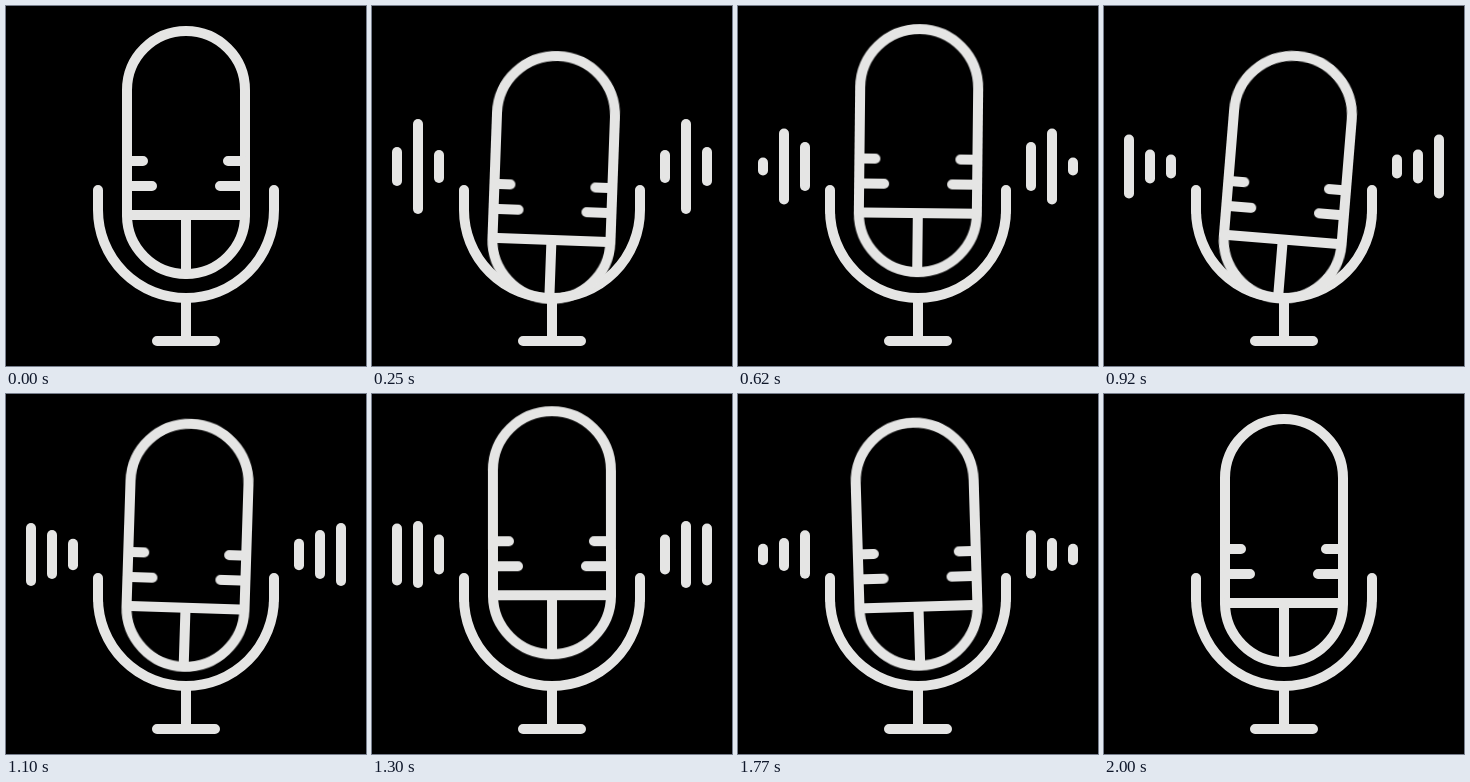
An HTML page for the animation above (2.02 s loop, 360x360 px).

```html
<!DOCTYPE html>
<html lang="en">
<head>
<meta charset="utf-8">
<title>Microphone</title>
<style>
  @property --half { syntax: "<length>"; inherits: false; initial-value: 0px; }

  html, body { margin: 0; width: 100%; height: 100%; overflow: hidden; background: #000; }
  svg { display: block; width: 100vw; height: 100vh; }

  .line { fill: none; stroke: #e5e5e4; stroke-width: 10; stroke-linecap: round; stroke-linejoin: round; }

  .capsule { transform-origin: 180px 194px; animation: bounce 2020ms ease-in-out infinite; }

  .bar {
    fill: #e5e5e4;
    width: 10px;
    rx: 5px;
    y: calc(160.5px - var(--half));
    height: calc(2 * var(--half));
    animation: 2020ms ease-in-out infinite;
  }
  .outer { x: 20px; animation-name: outer; }
  .mid   { x: 41px; animation-name: mid; }
  .inner { x: 62px; animation-name: inner; }

  @keyframes bounce {
    0%, 99.01%, 100% { transform: translateY(0) rotate(0deg); }
    13.37% { transform: translateY(25.2px) rotate(2.1deg); }
    27.97% { transform: translateY(-6px) rotate(0deg); animation-timing-function: cubic-bezier(.25, 0, .6, 1); }
    43.07% { transform: translateY(25.6px) rotate(4.8deg); }
    63.12% { transform: translateY(-8px) rotate(0deg); }
    77.72% { transform: translateY(6.6px) rotate(-3.1deg); }
  }
  @keyframes outer {
    0%, 99.01%, 100% { --half: 0px; }
    12.38% { --half: 19.5px; }
    30.69% { --half: 9px; }
    45.54% { --half: 32px; }
    64.36% { --half: 31px; }
    76.73% { --half: 21px; }
  }
  @keyframes mid {
    0%, 99.01%, 100% { --half: 0px; }
    12.38% { --half: 47.5px; }
    30.69% { --half: 38px; }
    45.54% { --half: 17px; }
    64.36% { --half: 33.5px; }
    76.73% { --half: 32px; }
  }
  @keyframes inner {
    0%, 99.01%, 100% { --half: 0px; }
    12.38% { --half: 16.5px; }
    30.69% { --half: 24.5px; }
    45.54% { --half: 12px; }
    64.36% { --half: 20px; }
    76.73% { --half: 47px; }
  }
</style>
</head>
<body>
<svg viewBox="0 0 360 360">
  <!-- sound waves, mirrored on the right -->
  <g>
    <rect class="bar outer"/>
    <rect class="bar mid"/>
    <rect class="bar inner"/>
  </g>
  <g transform="translate(360) scale(-1 1)">
    <rect class="bar outer"/>
    <rect class="bar mid"/>
    <rect class="bar inner"/>
  </g>

  <!-- stand -->
  <path class="line" d="M92 184V204A88 88 0 0 0 268 204V184M180 292V335M151 335H209"/>

  <g class="capsule">
    <rect class="line" x="121" y="25" width="118" height="243" rx="59"/>
    <path class="line" d="M121 209H239M180 209V268M121 155H137M121 180H146M239 155H222M239 180H214"/>
  </g>
</svg>
</body>
</html>
```
